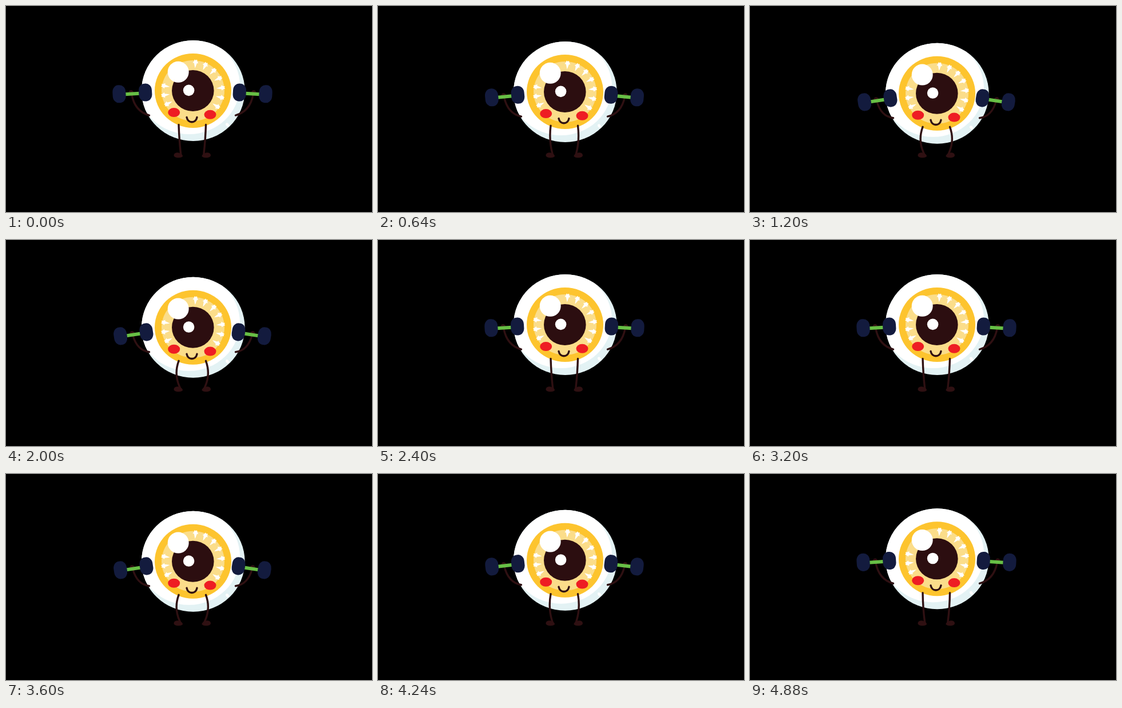
An HTML page for the animation above (4960 ms loop, 640x360 px).

```html
<!DOCTYPE html>
<html lang="en">
<head>
<meta charset="utf-8">
<style>
  html, body { margin: 0; width: 100%; height: 100%; overflow: hidden; background: #000; }
  svg { display: block; width: 100vw; height: 100vh; }
  .line { fill: none; stroke: #2f1012; stroke-width: 3.4; stroke-linecap: round; }
</style>
</head>
<body>
<svg viewBox="0 0 640 360">
  <defs>
    <clipPath id="ball"><ellipse cx="327.3" cy="148" rx="90.3" ry="88"/></clipPath>
  </defs>

  <g id="body">
    <g clip-path="url(#ball)">
      <rect x="230" y="55" width="195" height="190" fill="#e3f2f4"/>
      <ellipse cx="320" cy="139" rx="89" ry="85" fill="#fff"/>
    </g>
    <ellipse cx="387" cy="207.5" rx="2.5" ry="3.5" fill="#fff" transform="rotate(-35 387 207.5)"/>
    <ellipse cx="327" cy="148" rx="67" ry="65" fill="#fdc42e"/>
    <ellipse cx="327" cy="148" rx="55" ry="53" fill="#fbdd8a"/>
    <g id="rays" fill="#fff"></g>
    <ellipse cx="326.8" cy="148" rx="36.8" ry="36" fill="#2c0e10"/>
    <circle cx="319.6" cy="147.3" r="9.8" fill="#fff"/>
    <circle cx="301.2" cy="115.3" r="18.5" fill="#fff"/>
    <g fill="#ee1d23">
      <ellipse cx="293.7" cy="186" rx="10.5" ry="8"/>
      <ellipse cx="357" cy="189.8" rx="10.5" ry="8"/>
    </g>
    <path class="line" stroke-width="4" d="M316 194.5C318 205.5 332 205.5 334 194.5"/>
  </g>

  <g id="leg">
    <path id="shin" class="line"/>
    <path d="M293.5 261C293.5 257 298 255.5 302 256.5C306 257.5 309 260 309 262.5C308 266 293.5 266.5 293.5 261Z" fill="#2f1012"/>
  </g>
  <use href="#leg" transform="translate(651.5) scale(-1 1)"/>

  <g id="arm">
    <path id="sleeve" class="line"/>
    <g id="dumbbell">
      <ellipse cx="-2" cy="-1" rx="4.5" ry="4.5" fill="#2f1012"/>
      <rect x="-13" y="-2" width="26" height="6" fill="#67bf45"/>
      <g fill="#131b3e">
        <rect x="-34.4" y="-15.5" width="23" height="31" rx="10.5" ry="12"/>
        <rect x="11.4" y="-15.5" width="23" height="31" rx="10.5" ry="12"/>
      </g>
    </g>
  </g>
  <use href="#arm" transform="translate(652) scale(-1 1)"/>
</svg>
<script>
  const LOOP = 4960, STEP = 80, SQUAT = 800, LAG = 22;
  const $ = id => document.getElementById(id);
  const mix = (a, b, k) => a + (b - a) * k;

  const angles = [-85, -65, -45, -26, -6, 14, 34, 152, 171, 190];
  $('rays').innerHTML = angles.map(a =>
    `<path transform="translate(327 148) scale(1 .97) rotate(${a})"
      d="M41 0L50 -2.6L50 -5L53 -3L56.5 -2L55 0L56.5 2L53 3L50 5L50 2.6Z"/>`).join('');

  function draw(time) {
    const t = Math.floor(time % LOOP / STEP) * STEP;
    const k = (1 - Math.cos(2 * Math.PI * (t - LAG) / SQUAT)) / 2;
    const drop = 4.8 * k;
    const handX = mix(220.8, 222.8, k), handY = mix(152.3, 164.5, k);

    $('body').setAttribute('transform', `translate(0 ${drop})`);
    $('shin').setAttribute('d', `M302 ${207.5 + drop * .8}Q${mix(303, 292.5, k)} 237 306 261.5`);
    $('sleeve').setAttribute('d',
      `M250.5 ${191 + drop}Q${mix(225, 229, k)} ${mix(184, 193, k)} ${handX - 1} ${handY + 2}`);
    $('dumbbell').setAttribute('transform',
      `translate(${handX} ${handY}) rotate(${mix(-3.3, -8.8, k)})`);
  }

  const start = performance.now();
  function tick() {
    draw(performance.now() - start);
    requestAnimationFrame(tick);
  }
  tick();
</script>
</body>
</html>
```
